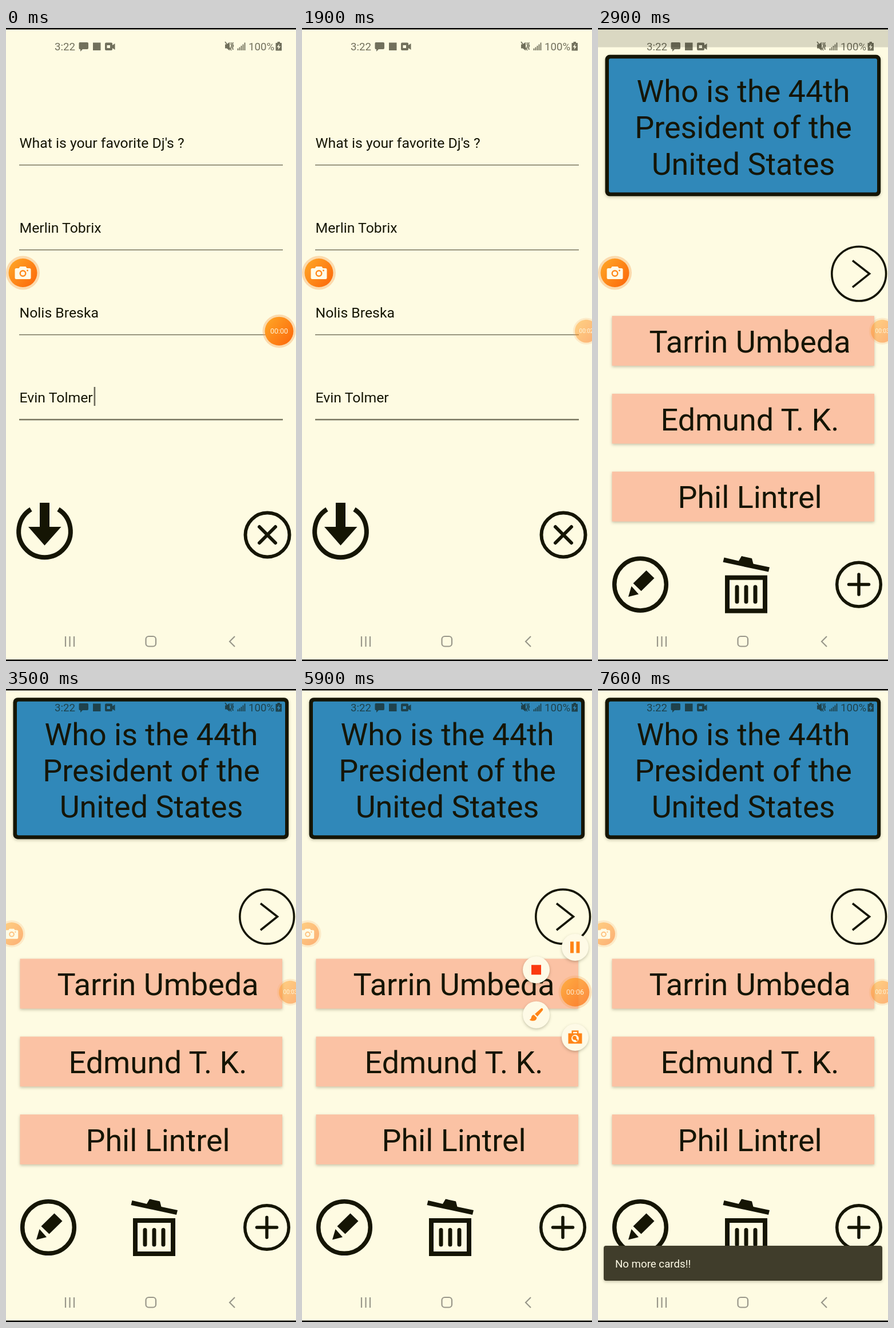
An HTML page that plays this animation: 507 by 1104 pixels, repeating every 8 s.

```html
<!DOCTYPE html>
<html lang="en">
<head>
<meta charset="utf-8">
<title>Quiz cards</title>
<style>
  html, body { margin: 0; width: 100%; height: 100%; overflow: hidden; background: #fefbe2; }
  svg { display: block; width: 100%; height: 100%; }
  text { font-family: Roboto, "Noto Sans", sans-serif; fill: #151504; }
  .field { font-size: 24.8px; }
  .big { font-size: 53.9px; text-anchor: middle; }
  .small { font-size: 18.7px; }
  .ink { fill: #151504; }
  .line { fill: none; stroke: #151504; }
  .round { stroke-linecap: round; }
  .rule { stroke: #77755f; }
  .raised { filter: drop-shadow(0 2px 2.5px rgba(30, 30, 0, .25)); }
  .page { fill: #fefbe2; }
  .status { opacity: .6; }
  .nav { fill: none; stroke: #99978a; stroke-width: 2.2; }
  .orange { fill: #ff8417; }
  .snack text { fill: #fdfae6; }
  .snack rect { fill: #403d2b; }
  .halo { fill: #f6a85c; opacity: .4; }
  .chip { fill: #fefae6; }
</style>
</head>
<body>
<svg viewBox="0 0 507 1104" preserveAspectRatio="none">
  <defs>
    <linearGradient id="glow" x1="0" y1="0.1" x2="1" y2="0.9">
      <stop offset="0" stop-color="#ffa626"/>
      <stop offset="1" stop-color="#fc680b"/>
    </linearGradient>
  </defs>

  <rect class="page" width="507" height="1104"/>
  <rect id="shade" width="507" height="1104"/>

  <g id="deck">
    <rect class="page" y="2" width="507" height="1104"/>
    <g class="raised">
      <rect class="ink" x="12.5" y="15.2" width="481.7" height="246.5" rx="8"/>
      <rect x="19" y="21.7" width="469" height="233.5" rx="3" fill="#3088b9"/>
    </g>
    <g id="question"></g>
    <g class="line" stroke-width="3.6">
      <circle cx="456.2" cy="397" r="47.4"/>
      <path d="M445 374 474.5 397 445 420.5"/>
    </g>
    <g id="answers"></g>

    <circle class="line" cx="74" cy="939" r="45.3" stroke-width="7.5"/>
    <path class="ink" d="M84.5 914.5 98.5 928 75.5 950.5 61.5 937ZM58.5 942 71 956 53 960.5Z"/>
    <path class="ink" d="M220.5 892 246 898 251 889.5 269 893.5 271.5 903 300 909 298 917 218.5 900Z"/>
    <rect class="line" x="226" y="927" width="66" height="58" stroke-width="8"/>
    <path class="line round" stroke-width="7" d="M243 943.5V969M259 943.5V969M275 943.5V969"/>
    <circle class="line" cx="456" cy="939" r="38.3" stroke-width="5.5"/>
    <path class="line round" stroke-width="5.5" d="M438.5 939H473.5M456 921.5V956.5"/>
  </g>

  <g id="form">
    <rect class="page" y="2" width="507" height="1099"/>
    <g id="fields"></g>
    <rect id="caret" x="153.6" y="626" width="2.6" height="33" fill="#6b695a"/>
    <path class="line" stroke-width="8" d="M43.5 839.5A45.3 45.3 0 1 0 91.5 839.5"/>
    <path class="ink" d="M59 828H76V870H96.5L67.5 902.5 39 870H59Z"/>
    <circle class="line" cx="457" cy="884" r="38.5" stroke-width="6"/>
    <path class="line round" stroke-width="6" d="M443 870 471 898M471 870 443 898"/>
    <g id="saved" class="snack">
      <rect x="10" y="971" width="487" height="61" rx="4"/>
      <text class="small" x="30" y="1008.5">Card successful Created</text>
    </g>
  </g>

  <g id="notice" class="snack raised">
    <rect x="10" y="971" width="487" height="61" rx="4"/>
    <text class="small" x="30" y="1008.5">No more cards!!</text>
  </g>

  <g class="status">
    <text class="small" x="85" y="39">3:22</text>
    <path class="ink" d="M129 25H142Q144 25 144 27V35Q144 37 142 37H134L130 41V37H129Q127.5 37 127.5 35V27Q127.5 25 129 25Z"/>
    <rect class="ink" x="152" y="25.5" width="13.5" height="13.5"/>
    <path class="ink" fill-rule="evenodd" d="M175 25.5H184Q186 25.5 186 27.5V30L190.5 27V38L186 35V37Q186 39 184 39H175Q173 39 173 37V27.5Q173 25.5 175 25.5ZM176.5 30V35H182V30Z"/>
    <path class="ink" d="M383 28.5H386L391 24.5V39.5L386 35.5H383Z"/>
    <path class="line" stroke-width="1.7" d="M383 24 394 39M393.5 25V29L395 31 393.5 33V36M397 25 396 28 397.5 31 396 34 397 38"/>
    <path class="line" stroke-width="1.8" d="M405.5 39V35.5M408.5 39V33.5M411.5 39V31M414.5 39V28.5M417.5 39V25.5"/>
    <text class="small" x="424" y="39">100%</text>
    <path class="ink" fill-rule="evenodd" d="M474.5 24H479V26H482V39.5H471.5V26H474.5ZM478 27.5 473.5 33.5H476.5L475.5 38 480 32H477Z"/>
  </g>
  <g class="nav">
    <path d="M104 1061V1079M111.5 1061V1079M119 1061V1079M400 1061 391 1070 400 1079"/>
    <rect x="244.5" y="1061" width="17.5" height="17.5" rx="5"/>
  </g>

  <g id="camera">
    <circle class="halo" r="29.5"/>
    <circle r="25" fill="url(#glow)"/>
    <path fill="#fffbe8" d="M-11.5-8H-7L-5-11H5L7-8H11.5Q14-8 14-5.5V8.5Q14 11 11.5 11H-11.5Q-14 11-14 8.5V-5.5Q-14-8-11.5-8Z"/>
    <circle cy="1" r="4.8" fill="none" stroke="#ff8a1c" stroke-width="2.4"/>
    <circle class="orange" cx="8" cy="-4" r="1.4"/>
  </g>

  <g id="menu">
    <g>
      <path class="orange" d="M-8.5-10H-2.5V10H-8.5ZM2-10H8V10H2Z"/>
    </g>
    <g>
      <rect x="-8.5" y="-8.5" width="17" height="17" fill="#fb3a10"/>
    </g>
    <g>
      <path class="orange" d="M9-11.5Q12.5-12 11.5-8L2 3-2.5-1.5ZM-4 0 1 5Q0 11-7 10.5-10 10.5-12 8.5-9 8-8.5 4-7.5 0-4 0Z"/>
    </g>
    <g>
      <path class="orange" fill-rule="evenodd" d="M-6-7V-12H6V-7H12V11H-12V-7ZM-3.5-7H3.5V-9.5H-3.5Z"/>
      <circle class="chip" cy="2" r="6.5"/>
      <path d="M-1 1 4 6" stroke="#ff8417" stroke-width="3"/>
      <circle class="orange" cx="-1" cy="1" r="3.4"/>
    </g>
  </g>

  <g id="recorder">
    <circle class="halo" r="29"/>
    <circle r="25" fill="url(#glow)"/>
    <text id="timer" y="4.4" text-anchor="middle" style="font-size:12.5px;fill:#fff3d6"></text>
  </g>

  <path d="M0 0H507V2.5H0ZM0 1101.5H507V1104H0Z"/>
</svg>

<script>
const LOOP = 8000, STEP = 100;
const get = id => document.getElementById(id);

get('fields').innerHTML = ["What is your favorite Dj's ?", 'Merlin Tobrix', 'Nolis Breska', 'Evin Tolmer']
  .map((label, i) => {
    const y = 209 + i * 148;
    const width = i === 3 ? 2.5 : 1.5;
    return `<text class="field" x="23.5" y="${y}">${label}</text>
      <path class="rule" stroke-width="${width}" d="M23 ${y + 30}H484"/>`;
  }).join('');

get('question').innerHTML = ['Who is the 44th', 'President of the', 'United States']
  .map((line, i) => `<text class="big" x="254" y="${97.5 + i * 63.4}">${line}</text>`)
  .join('');

get('answers').innerHTML = ['Tarrin Umbeda', 'Edmund T. K.', 'Phil Lintrel']
  .map((name, i) => {
    const y = 470.5 + i * 135.8;
    return `<rect class="raised" x="24.5" y="${y}" width="458.5" height="87" fill="#fbc2a4"/>
      <text class="big" x="265.5" y="${y + 63.7}">${name}</text>`;
  }).join('');

const chips = [...get('menu').children];
chips.forEach(chip => chip.insertAdjacentHTML('afterbegin', '<circle class="chip raised" r="23.5"/>'));
const chipAngles = [-90, -150, 150, 90].map(a => a * Math.PI / 180);

// Each track is a list of [time, value] with straight runs between.
const tracks = {
  deckY: [[2600, 1104], [2700, 420], [2800, 136.7], [2900, 31.6], [3000, 9], [3100, 2], [3200, 0]],
  shade: [[2600, 0], [2700, .02], [2800, .065], [2900, .14], [3100, .2]],
  formY: [[2600, 0], [2800, -16]],
  formAlpha: [[2600, 1], [2700, .4], [2800, .025], [2900, 0]],
  saved: [[2600, 0], [2800, .6]],
  savedScale: [[2600, .8], [2800, .96], [2900, 1]],
  cameraDock: [[3200, 0], [3500, 1]],
  recDock: [[1000, 0], [1300, 1], [5600, 1], [5900, 0], [6700, 0], [7000, 1]],
  recAlpha: [[1000, 1], [1300, .5], [5600, .5], [6000, .85], [6200, 1], [6700, 1], [7000, .5]],
  menu: [[5600, 0], [5900, 1], [6300, 1], [6500, 0]],
  notice: [[7000, 0], [7200, 1]]
};

function at(name, t) {
  const keys = tracks[name];
  const next = keys.findIndex(k => k[0] > t);
  if (next === 0) return keys[0][1];
  if (next < 0) return keys[keys.length - 1][1];
  const [t0, v0] = keys[next - 1], [t1, v1] = keys[next];
  return v0 + (v1 - v0) * (t - t0) / (t1 - t0);
}

function place(el, x, y, scale = 1, alpha = 1) {
  el.setAttribute('transform', `translate(${x} ${y}) scale(${scale})`);
  el.style.opacity = alpha;
  el.style.display = alpha > 0 ? '' : 'none';
}

// Scales a snackbar about its own centre.
function placeSnack(el, scale, alpha) {
  place(el, 253.5 * (1 - scale), 1001.5 * (1 - scale), scale, alpha);
}

function draw(t) {
  get('shade').style.opacity = at('shade', t);
  place(get('deck'), 0, at('deckY', t));
  place(get('form'), 0, at('formY', t), 1, at('formAlpha', t));
  placeSnack(get('saved'), at('savedScale', t), at('saved', t));

  const shown = at('notice', t);
  placeSnack(get('notice'), .8 + .2 * shown, shown);

  const caretOn = t < 500 || (t >= 1000 && t < 1500) || t >= 2400;
  get('caret').style.display = caretOn ? '' : 'none';

  const cam = at('cameraDock', t);
  place(get('camera'), 29.5 - 19.5 * cam, 427, 1 - .2 * cam, 1 - .5 * cam);

  const dock = at('recDock', t);
  place(get('recorder'), 477.5 + 19.5 * dock, 528.7, 1 - .2 * dock, at('recAlpha', t));
  get('timer').textContent = '00:0' + Math.floor((t + 200) / 1000);

  const open = at('menu', t);
  chips.forEach((chip, i) => place(chip,
    477.5 + 78.5 * open * Math.cos(chipAngles[i]),
    529 + 78.5 * open * Math.sin(chipAngles[i]),
    open, open));
}

function tick() {
  const t = performance.now() % LOOP;
  draw(Math.floor(t / STEP) * STEP);
  requestAnimationFrame(tick);
}
tick();
</script>
</body>
</html>
```
